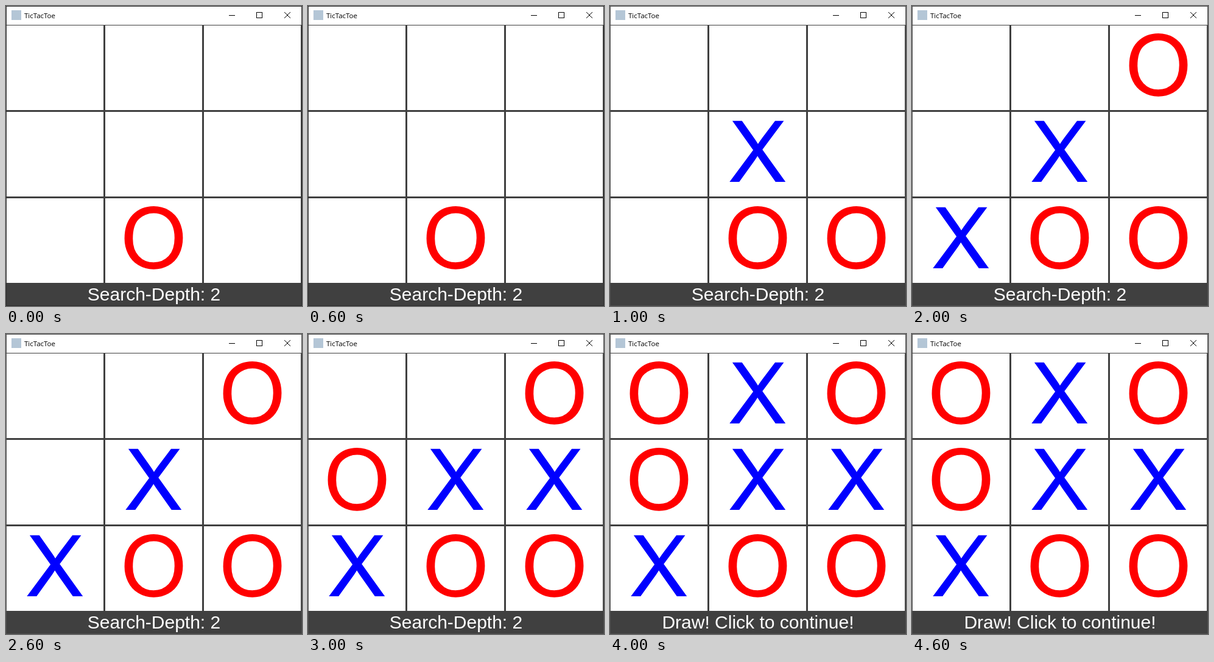
Write an HTML page that moves like this. It is 486x493 px and loops after 5 s.

```html
<!DOCTYPE html>
<html lang="en">
<head>
<meta charset="utf-8">
<title>TicTacToe</title>
<style>
  html, body { margin: 0; width: 100%; height: 100%; overflow: hidden; background: #fff; }
  svg { display: block; }
  text { font-kerning: none; }
  .title { font: 11.5px "Open Sans", "Noto Sans", sans-serif; font-kerning: normal; }
  .status { font: 30px "Liberation Sans", Arial, sans-serif; fill: #fff; text-anchor: middle; }
  .line { fill: none; stroke: #000; }
</style>
</head>
<body>
<svg width="486" height="493" viewBox="0 0 486 493">
  <defs>
    <path id="O" fill="#f00" d="M99 714q0 365 196 571.5t506 206.5q203 0 366-97t248.5-270.5t85.5-393.5q0-223-90-399t-255-266.5t-356-90.5q-207 0-370 100t-247 273t-84 366zM299 711q0-265 142.5-417.5t357.5-152.5q219 0 360.5 154t141.5 437q0 179-60.5 312.5t-177 207t-261.5 73.5q-206 0-354.5-141.5t-148.5-472.5z"/>
    <path id="X" fill="#00f" d="M9 0l567 764l-500 702h231l266-376q83-117 118-180q49 80 116 167l295 389h211l-515-691l555-775h-240l-369 523q-31 45-64 98q-49-80-70-110l-368-511z"/>
  </defs>
  <rect width="486" height="493" fill="#404040"/>
  <rect x="1" y="1" width="484" height="30" fill="#fff"/>
  <rect x="9" y="7" width="16" height="16" fill="#b4c6d6"/>
  <text class="title" x="30" y="20">TicTacToe</text>
  <g class="line">
    <path d="M366 15.5h10" shape-rendering="crispEdges"/>
    <rect x="411.5" y="10.5" width="9" height="9"/>
    <path d="M457 10l10 10M467 10l-10 10"/>
  </g>
  <g id="cells" fill="#fff"></g>
  <g id="marks"></g>
  <text class="status" id="status" x="243" y="484"></text>
  <rect id="edge" x=".5" y=".5" width="485" height="492" fill="none"/>
</svg>
<script>
  const STEP = 1000;
  const PITCH_X = 162, PITCH_Y = 142;
  const SCALE = 140 / 2048;
  const START_X = { O: 25.8, X: 33.7 };

  // [step, mark, column, row]
  const MOVES = [
    [0, "O", 1, 2],
    [1, "X", 1, 1], [1, "O", 2, 2],
    [2, "X", 0, 2], [2, "O", 2, 0],
    [3, "X", 2, 1], [3, "O", 0, 1],
    [4, "X", 1, 0], [4, "O", 0, 0]
  ];
  const STEPS = 5;

  const byId = id => document.getElementById(id);

  function add(parent, tag, attrs) {
    const el = document.createElementNS("http://www.w3.org/2000/svg", tag);
    for (const key in attrs) el.setAttribute(key, attrs[key]);
    return parent.appendChild(el);
  }

  for (let i = 0; i < 9; i++) {
    add(byId("cells"), "rect", {
      x: 1 + (i % 3) * PITCH_X,
      y: 32 + Math.floor(i / 3) * PITCH_Y,
      width: 159, height: 139
    });
  }

  const marks = MOVES.map(([step, mark, col, row]) => {
    const x = START_X[mark] + col * PITCH_X;
    const y = 147 + row * PITCH_Y;
    const el = add(byId("marks"), "use", {
      href: "#" + mark,
      transform: `translate(${x} ${y}) scale(${SCALE} ${-SCALE})`
    });
    return { el, step };
  });

  let shown = -1;
  function show(step) {
    if (step === shown) return;
    shown = step;
    for (const m of marks) m.el.setAttribute("visibility", m.step <= step ? "visible" : "hidden");
    byId("status").textContent = step === STEPS - 1 ? "Draw! Click to continue!" : "Search-Depth: 2";
    byId("edge").setAttribute("stroke", step ? "#4c4c4c" : "#2c2c2c");
  }

  const start = performance.now();
  function tick() {
    show(Math.floor((performance.now() - start) / STEP) % STEPS);
    requestAnimationFrame(tick);
  }
  tick();
</script>
</body>
</html>
```
